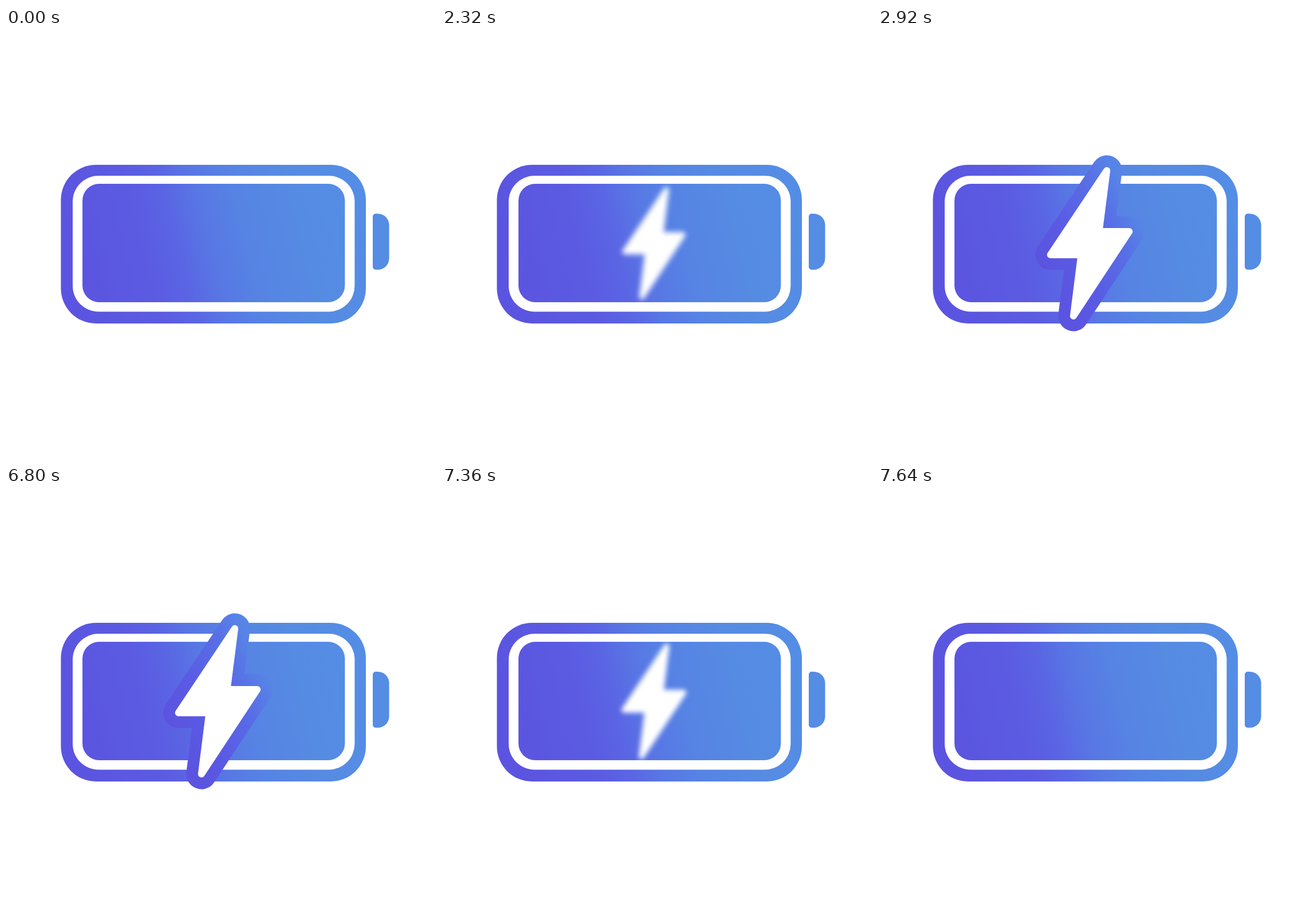
Recreate the animation shown at these times as an HTML page. Size 748x748 px, loop 9.8 s.

```html
<!DOCTYPE html>
<html lang="en">
<head>
<meta charset="utf-8">
<title>Charging battery</title>
<style>
  html, body { margin: 0; width: 100%; height: 100%; overflow: hidden; background: #fff; }
  svg { display: block; width: 100vw; height: 100vh; }
  #dots { filter: blur(3px); }
</style>
</head>
<body>
<svg viewBox="0 0 748 748">
  <defs>
    <linearGradient id="body" gradientUnits="userSpaceOnUse" x1="110" y1="374" x2="611" y2="254">
      <stop offset="0" stop-color="#5b54e0"/>
      <stop offset=".26" stop-color="#5b5ce2"/>
      <stop offset=".36" stop-color="#5a66e4"/>
      <stop offset=".45" stop-color="#5876e4"/>
      <stop offset=".58" stop-color="#5683e4"/>
      <stop offset=".77" stop-color="#568be2"/>
      <stop offset="1" stop-color="#548de6"/>
    </linearGradient>
    <linearGradient id="rim" gradientUnits="userSpaceOnUse" x1="270" y1="374" x2="462" y2="278">
      <stop offset="0" stop-color="#5b54e0"/>
      <stop offset=".25" stop-color="#5a5ae4"/>
      <stop offset=".62" stop-color="#586ee6"/>
      <stop offset=".83" stop-color="#5782e6"/>
      <stop offset="1" stop-color="#568ae2"/>
    </linearGradient>
    <path id="bolt" stroke-linejoin="round"
      d="M398 248L384.5 354H437L340 501L353.5 394.5H300Z"/>
  </defs>

  <rect x="95.5" y="238" width="530.5" height="276" rx="61" fill="url(#body)"/>
  <rect x="116" y="257" width="490.5" height="236.5" rx="45" fill="#fff"/>
  <rect x="133" y="271" width="456.5" height="206" rx="29" fill="url(#body)"/>
  <path fill="#558ce4"
    d="M643 323H646.5A20 20 0 0 1 666.5 343V400.5A20 20 0 0 1 646.5 420.5H643A5 5 0 0 1 638 415.5V328A5 5 0 0 1 643 323Z"/>

  <g id="dots" fill="#fff" opacity="0">
    <circle cx="360" cy="365" r="6"/>
    <circle cx="378" cy="381" r="5.5"/>
  </g>
  <use id="outline" href="#bolt" fill="url(#rim)" stroke="url(#rim)" stroke-width="53"/>
  <g id="glow">
    <use id="flash" href="#bolt" fill="#fff" stroke="#fff" stroke-width="12"/>
  </g>
</svg>
<script>
const LOOP = 9800, STEP = 40, IN = 2080, OUT = 6800, SPAN = 840, POWER = 3.5;
const [dots, outline, glow, flash] =
  ["dots", "outline", "glow", "flash"].map(id => document.getElementById(id));

const clamp = v => Math.min(1, Math.max(0, v));
const smooth = (a, b, v) => {
  const u = clamp((v - a) / (b - a));
  return u * u * (3 - 2 * u);
};

// Grows with an ease-out, shrinks with the matching ease-in.
function scaleAt(t) {
  if (t < OUT) return 1 - (1 - clamp((t - IN + STEP) / (SPAN + STEP))) ** POWER;
  return 1 - clamp((t - OUT) / SPAN) ** POWER;
}

function draw(t) {
  const s = scaleAt(t);
  const pose = `translate(369 374.5) scale(${s}) translate(-369 -374.5)`;
  const blur = 12 * s * Math.sqrt(1 - s);
  flash.setAttribute("transform", pose);
  outline.setAttribute("transform", pose);
  glow.style.filter = blur > 0.1 ? `blur(${blur}px)` : "none";
  glow.style.opacity = smooth(0.16, 0.6, s);
  outline.style.opacity = smooth(0.9, 0.995, s);
  dots.style.opacity = s > 0 && s < 0.2 ? 0.17 : 0;
}

function tick() {
  const t = performance.now() % LOOP;
  draw(Math.floor(t / STEP) * STEP);
  requestAnimationFrame(tick);
}
tick();
</script>
</body>
</html>
```
